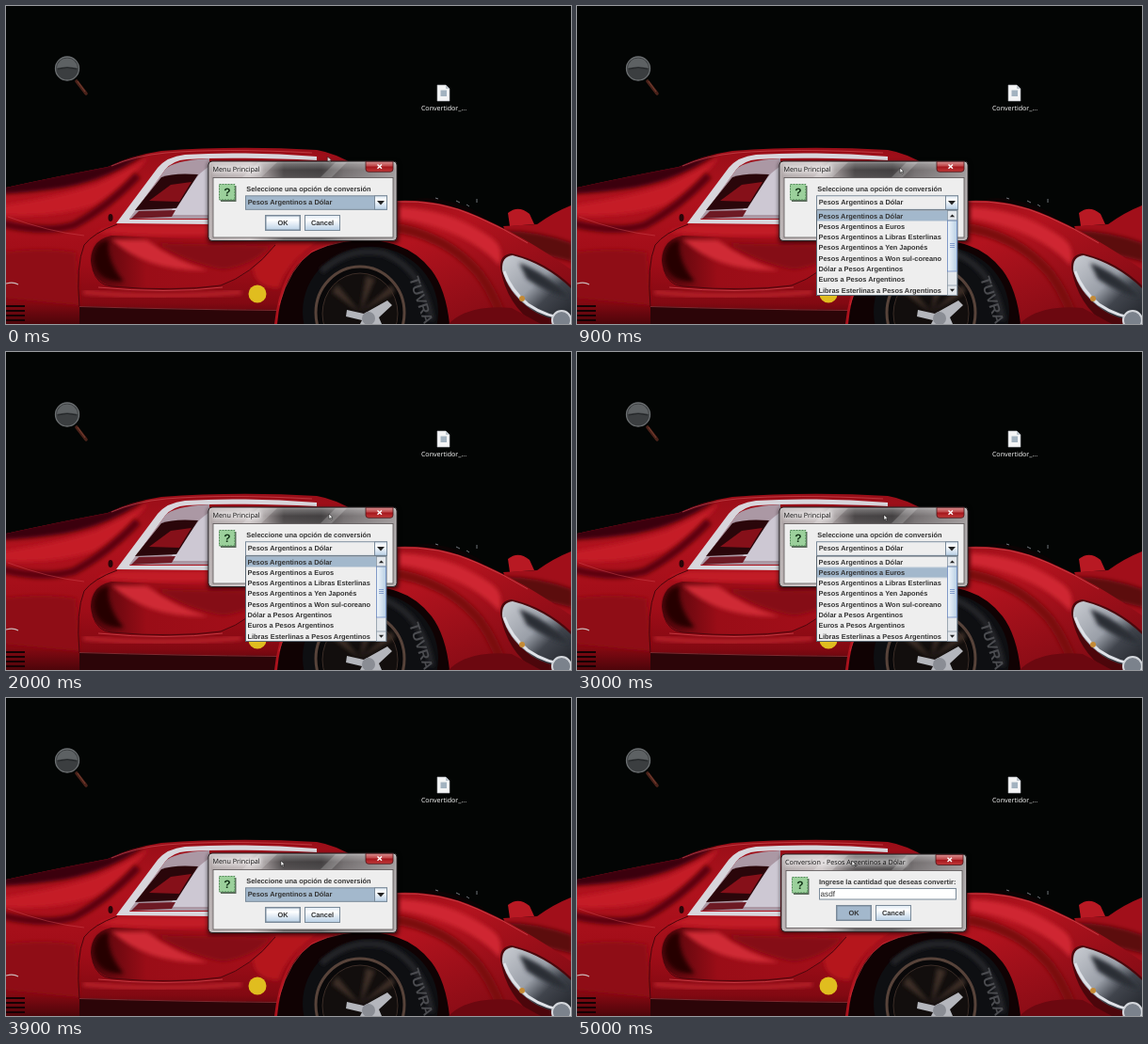
Recreate the animation shown at these times as an HTML page. Size 600 by 338 pixels, loop 5.1 s.

```html
<!DOCTYPE html>
<html lang="es">
<head>
<meta charset="utf-8">
<title>Convertidor</title>
<style>
  html, body { margin: 0; width: 100%; height: 100%; overflow: hidden; background: #030504; }
  svg { display: block; width: 600px; height: 338px; }
  text { font: bold 7.4px "Liberation Sans", Arial, sans-serif; fill: #333; text-rendering: geometricPrecision; white-space: pre; }
  .ui { font: 7.2px "Open Sans", "Noto Sans", sans-serif; fill: #111; }
  .mid { text-anchor: middle; }
  .typed { font-weight: normal; font-size: 8.2px; }
  .glow { fill: #fff; opacity: .5; filter: url(#soft); }
  .shade { filter: url(#soft); }
  .line { fill: none; }

  .menu, .ask, .list, .row, .press, .typed tspan { animation: 5.1s step-end infinite; }
  .menu { animation-name: menu; }
  .ask { animation-name: ask; }
  .list { animation-name: list; }
  .row { animation-name: row; }
  .press { animation-name: press; }
  .typed tspan:nth-child(1) { animation-name: key1; }
  .typed tspan:nth-child(2) { animation-name: key2; }
  .typed tspan:nth-child(3) { animation-name: key3; }
  .typed tspan:nth-child(4) { animation-name: key4; }
  .cursor { animation: move 5.1s linear infinite; }

  @keyframes menu { 0% { opacity: 1 } 82.35%, 100% { opacity: 0 } }
  @keyframes ask { 0% { opacity: 0 } 82.35%, 100% { opacity: 1 } }
  @keyframes list { 0% { opacity: 0 } 9.8% { opacity: 1 } 66.67%, 100% { opacity: 0 } }
  @keyframes row { 0% { transform: none } 49.02% { transform: translateY(11.3px) } 62.75%, 100% { transform: none } }
  @keyframes press { 0% { opacity: 0 } 96.08%, 100% { opacity: 1 } }
  @keyframes key1 { 0% { visibility: hidden } 88.24%, 100% { visibility: visible } }
  @keyframes key2 { 0% { visibility: hidden } 90.2%, 100% { visibility: visible } }
  @keyframes key3 { 0% { visibility: hidden } 92.16%, 100% { visibility: visible } }
  @keyframes key4 { 0% { visibility: hidden } 94.12%, 100% { visibility: visible } }
  @keyframes move {
    0% { transform: translate(341.5px, 160px) }
    7.84%, 43.14% { transform: translate(343px, 172px) }
    54.9%, 62.75% { transform: translate(326px, 173px) }
    72.55%, 100% { transform: translate(292px, 173px) }
  }
</style>
</head>
<body>
<svg viewBox="0 0 600 338">
  <defs>
    <linearGradient id="body" x2="0" y2="1">
      <stop offset="0" stop-color="#990e18"/><stop offset=".3" stop-color="#b0121d"/>
      <stop offset=".65" stop-color="#a00d18"/><stop offset=".88" stop-color="#830912"/><stop offset="1" stop-color="#4d050a"/>
    </linearGradient>
    <linearGradient id="fender" x2="1" y2="1">
      <stop offset="0" stop-color="#8d0c15"/><stop offset=".4" stop-color="#b2131e"/><stop offset="1" stop-color="#780912"/>
    </linearGradient>
    <linearGradient id="scoop" x2="1">
      <stop offset="0" stop-color="#4c050a"/><stop offset=".3" stop-color="#9a0d17"/><stop offset="1" stop-color="#a50f1a"/>
    </linearGradient>
    <linearGradient id="glass" x2="1">
      <stop offset="0" stop-color="#a3999a"/><stop offset=".22" stop-color="#bdb4b5"/><stop offset=".31" stop-color="#857d7e"/>
      <stop offset=".4" stop-color="#3b3738"/><stop offset=".6" stop-color="#322f30"/>
      <stop offset=".72" stop-color="#686364"/><stop offset="1" stop-color="#989293"/>
    </linearGradient>
    <linearGradient id="sheen" x2="0" y2="1">
      <stop offset="0" stop-color="#fff" stop-opacity=".35"/><stop offset=".1" stop-color="#fff" stop-opacity=".08"/>
      <stop offset=".22" stop-color="#fff" stop-opacity=".15"/><stop offset="1" stop-color="#fff" stop-opacity=".25"/>
    </linearGradient>
    <linearGradient id="close" x2="0" y2="1">
      <stop offset="0" stop-color="#d58f8f"/><stop offset=".45" stop-color="#bf4548"/>
      <stop offset=".5" stop-color="#a3151b"/><stop offset="1" stop-color="#c23a3a"/>
    </linearGradient>
    <linearGradient id="metal" x2="0" y2="1">
      <stop offset="0" stop-color="#dde8f3"/><stop offset=".3" stop-color="#fff"/><stop offset="1" stop-color="#b8cfe5"/>
    </linearGradient>
    <linearGradient id="bar" x2="1">
      <stop offset="0" stop-color="#f2f7fb"/><stop offset="1" stop-color="#b8cfe5"/>
    </linearGradient>
    <linearGradient id="lamp" x2="1" y2="1">
      <stop offset="0" stop-color="#c9ccd2"/><stop offset=".45" stop-color="#9a9fa8"/>
      <stop offset=".65" stop-color="#40444c"/><stop offset="1" stop-color="#22252b"/>
    </linearGradient>
    <filter id="soft" x="-20%" y="-50%" width="140%" height="200%"><feGaussianBlur stdDeviation="2.2"/></filter>

    <path id="shell" d="M0 193Q50 182 108 171Q132 159 165 154Q245 148 330 153Q372 160 415 208L470 338H0z"/>
    <clipPath id="in-shell"><use href="#shell"/></clipPath>

    <rect id="button" x=".5" y=".5" width="37" height="16" fill="url(#metal)" stroke="#7a8a99"/>
    <g id="ask-icon">
      <path d="M2 2H18.5V19H2z" fill="#5d6b5d"/>
      <rect x=".5" y=".5" width="16.5" height="16.5" fill="#9bd09b" stroke="#4f8a55" stroke-dasharray="2 1"/>
      <text class="mid" x="9" y="13" style="font-size:12px;fill:#143318">?</text>
    </g>
    <g id="close-box">
      <path d="M0 0H29V8Q29 11 26 11H3Q0 11 0 8z" fill="url(#close)" stroke="#4a1518" stroke-width=".8"/>
      <path d="M12.500 3.200l4.500 4.200m0-4.200l-4.500 4.200" stroke="#fff" stroke-width="1.4"/>
    </g>
    <path id="down" d="M-4-2H4L0 2.5z" fill="#222"/>
  </defs>

  <rect width="600" height="338" fill="#030504"/>

  <!-- car -->
  <g>
    <use href="#shell" fill="url(#body)"/>
    <g clip-path="url(#in-shell)">
      <path class="shade" d="M-5 190L108 169L150 156Q110 184 62 193Q30 198-5 200z" fill="#3a050a"/>
      <path class="shade" d="M-5 212Q58 203 98 189Q130 174 152 160Q122 196 92 212Q50 226-5 222z" fill="#c51c28"/>
      <path class="shade line" d="M-5 231Q40 242 72 233Q108 214 140 180" stroke="#5c060d" stroke-width="8"/>
      <path class="shade" d="M-5 262Q40 256 74 262L78 318L-5 310z" fill="#8f0b15"/>
      <path class="shade" d="M118 233H216V244Q150 246 96 240z" fill="#c21c27"/>
      <path class="shade line" d="M82 304Q160 312 250 304" stroke="#b8202a" stroke-width="5"/>
      <path class="shade" d="M240 250H335Q300 268 290 300Q262 300 262 275z" fill="#b5141f"/>
    </g>
    <path class="line" d="M2 224Q45 240 83 244" stroke="#d14a53" stroke-width=".8" opacity=".6"/>

    <path d="M117 231L161 172Q171 160 190 158Q250 154 330 160V164Q240 160 192 163Q177 164 169 174L131 227H216V232z" fill="#d8d6dc"/>
    <path d="M131 226L169 174Q177 164 216 162V226z" fill="#ab98a4"/>
    <path d="M178 214L206 178L216 170V222H172z" fill="#cdc8d3"/>
    <path d="M137 217L165 182Q178 177 204 179L181 215z" fill="#2a060a"/>
    <path d="M152 207L175 190L197 187L184 208z" fill="#861019"/>
    <path d="M133 226L141 218L180 217L176 224z" fill="#6d1a24"/>
    <path class="line" d="M112 170Q137 159 170 156Q230 151 325 156" stroke="#d85a60" stroke-width=".8" opacity=".7"/>
    <ellipse cx="111" cy="225" rx="2.500" ry="4" fill="#2a0508"/>
    <path class="line" d="M118 232Q93 241 83 254Q74 276 78 320" stroke="#4a050b"/>

    <path d="M90 270Q91 248 112 244Q190 247 287 252Q266 285 225 297Q160 302 112 298Q91 292 90 270z" fill="url(#scoop)"/>
    <path class="shade" d="M93 268Q95 249 109 249Q106 270 125 293Q95 294 93 268z" fill="#270205"/>
    <path class="shade" d="M112 248L150 249Q178 270 215 281Q150 283 112 248z" fill="#cf2b35"/>
    <path class="shade" d="M160 252L282 255Q262 276 230 280Q190 272 160 252z" fill="#850a13"/>
    <path class="line" d="M92 280Q97 297 112 298Q180 304 228 297Q260 286 286 254" stroke="#4e060c"/>
    <path class="line" d="M98 299Q170 306 230 299" stroke="#d0454c" stroke-width=".8"/>
    <path class="line" d="M0 319H20M0 324H20M0 329H20M0 334H20" stroke="#160204" stroke-width="2.2"/>
    <path class="line" d="M0 295Q8 293 13 296" stroke="#cbb" stroke-width="1.2"/>
    <path d="M78 319Q180 322 290 323V338H78z" fill="#2c0508"/>
    <path class="line" d="M78 319.500Q180 322.500 290 323.500" stroke="#94343b" stroke-width=".8"/>

    <path d="M528 234L564 232Q582 219 600 212V290L540 262z" fill="#a10f1a"/>
    <path class="shade" d="M520 239Q560 237 602 252V272L545 258z" fill="#5c070d"/>
    <path d="M533 220Q544 211 556 221L561 232L535 234z" fill="#b81923"/>
    <path d="M430 206Q455 200 490 214Q503 218 516 232L488 225z" fill="#0c0304"/>
    <path class="line" d="M500 205v4m-22-2l4 2m-26-5l3 1m30 6l3 2" stroke="#8c9099" stroke-width=".8"/>
    <path d="M285 338Q292 272 335 248L415 207Q460 205 500 223Q551 245 600 280V338z" fill="url(#fender)"/>
    <path class="shade" d="M418 214Q470 215 515 246Q530 256 524 276Q490 238 418 226z" fill="#cf2832"/>
    <path class="shade line" d="M416 236Q470 246 502 284Q520 308 528 336" stroke="#7c0911" stroke-width="10"/>
    <path class="line" d="M415 208Q461 206 500 224Q530 237 554 252" stroke="#df5c62" stroke-width=".8" opacity=".7"/>
    <path d="M288 338Q293 284 323 263Q350 247 387 249Q429 251 452 281Q467 301 471 338z" fill="#100203"/>
    <path class="line" d="M290 318Q301 278 325 261Q357 246 394 249" stroke="#c9343d" opacity=".7"/>
    <path d="M525 279Q524 264 537 263Q572 271 600 297V338H562Q532 318 525 279z" fill="#4c060b"/>
    <path d="M527 281Q526 266 538 265Q573 274 600 300V335Q571 334 553 319Q533 303 527 281z" fill="url(#lamp)"/>
    <path class="shade" d="M545 273Q575 284 598 310Q574 305 553 290z" fill="#2a2e35"/>
    <path class="line" d="M529 282Q536 302 554 317Q574 331 600 333" stroke="#dfe2e8" stroke-width="3"/>
    <circle cx="548" cy="311" r="3" fill="#c48a35"/>
    <circle cx="590" cy="334" r="10" fill="#7b828c" stroke="#d5d8dd" stroke-width="2"/>
    <path d="M470 338Q490 317 537 321L568 338z" fill="#6c0810"/>

    <ellipse cx="387" cy="325" rx="72" ry="69" fill="#0e0f12"/>
    <path class="shade line" d="M335 282Q365 255 402 263Q444 281 452 334" stroke="#25272c" stroke-width="6"/>
    <text class="mid" x="0" y="0" transform="translate(436 314) rotate(72)" style="font-size:15px;fill:#4b4c50">TUVRA</text>
    <ellipse cx="376" cy="326" rx="47" ry="49" fill="#090809" stroke="#57433a" stroke-width="3"/>
    <ellipse cx="376" cy="327" rx="40" ry="43" fill="#120e0d" stroke="#3b2d27"/>
    <path class="shade" d="M376 326L346 304L352 296zM376 326L382 287L392 290zM376 326L410 296L413 304z" fill="#3c2e28"/>
    <path d="M362 323L380 327L405 313L410 318L396 331L399 338H376L378 334L361 330z" fill="#b4b6bc"/>
    <circle cx="385" cy="332" r="7" fill="#8a8d94"/>
    <circle cx="267" cy="306" r="9.5" fill="#e0bd1f"/>
  </g>

  <!-- desktop -->
  <path d="M75 80L85 93" stroke="#4a221a" stroke-width="3.600" stroke-linecap="round"/>
  <path d="M76 80L84 91" stroke="#8a4836" stroke-width=".8"/>
  <circle cx="65" cy="66.500" r="12.500" fill="#3b3e40" stroke="#6c7072" stroke-width="1.300"/>
  <path d="M54 66Q55 56 65 55.500Q75 56 76 66Q65 63 54 66z" fill="#5d6163"/>
  <path class="line" d="M55 67Q65 64 75 67" stroke="#222527"/>
  <path d="M458 84H467L471 88V101H458z" fill="#f4f5f6" stroke="#a8adb2" stroke-width=".6"/>
  <path d="M467 84V88H471z" fill="#bcc4cb"/>
  <rect x="461.500" y="89.500" width="6.500" height="6.500" fill="#a3b3c0"/>
  <text class="ui mid" x="465" y="110.5" style="font-size:7.1px;fill:#fff">Convertidor_...</text>

  <!-- option dialog -->
  <g class="menu">
    <rect class="shade" x="214" y="166" width="203" height="86" rx="4" opacity=".6"/>
    <rect x="215" y="165" width="200" height="84.5" rx="4" fill="url(#glass)" stroke="#292526"/>
    <path d="M268 166H288L270 183H250zM350 166H362L345 183H333z" fill="#fff" opacity=".2"/>
    <rect x="216" y="166" width="198" height="82.500" rx="3" fill="url(#sheen)" stroke="#fff" stroke-opacity=".45" stroke-width=".7"/>
    <rect class="glow" x="219" y="169" width="52" height="9"/>
    <text class="ui" x="219.5" y="175.8">Menu Principal</text>
    <use href="#close-box" x="382" y="165.3"/>
    <rect x="220" y="182.5" width="191" height="63.5" fill="#eee" stroke="#595354" stroke-width=".8"/>
    <use href="#ask-icon" x="226" y="189"/>
    <text x="255.3" y="197">Seleccione una opción de conversión</text>
    <rect x="254.5" y="201.800" width="150" height="14.5" fill="#a3b8cc" stroke="#7a8a99"/>
    <rect x="391.5" y="201.800" width="13" height="14.5" fill="url(#metal)" stroke="#7a8a99"/>
    <use href="#down" x="398" y="209"/>
    <text x="256.7" y="211.3">Pesos Argentinos a Dólar</text>
    <use href="#button" x="275" y="222"/>
    <rect x="276" y="223" width="36" height="15" class="line" stroke="#7a8a99"/>
    <use href="#button" x="317" y="222"/>
    <text class="mid" x="294" y="233.2">OK</text>
    <text class="mid" x="336" y="233.2">Cancel</text>

    <g class="list">
      <rect x="255" y="202.3" width="136" height="13.5" fill="#eee"/>
      <text x="256.7" y="211.3">Pesos Argentinos a Dólar</text>
      <rect x="254.5" y="217" width="149.5" height="90.5" fill="#eee" stroke="#596570"/>
      <rect class="row" x="255" y="217.5" width="138.5" height="11" fill="#a3b8cc"/>
      <text>
        <tspan x="256.5" y="225.5">Pesos Argentinos a Dólar</tspan>
        <tspan x="256.5" dy="11.3">Pesos Argentinos a Euros</tspan>
        <tspan x="256.5" dy="11.3">Pesos Argentinos a Libras Esterlinas</tspan>
        <tspan x="256.5" dy="11.3">Pesos Argentinos a Yen Japonés</tspan>
        <tspan x="256.5" dy="11.3">Pesos Argentinos a Won sul-coreano</tspan>
        <tspan x="256.5" dy="11.3">Dólar a Pesos Argentinos</tspan>
        <tspan x="256.5" dy="11.3">Euros a Pesos Argentinos</tspan>
        <tspan x="256.5" dy="11.3">Libras Esterlinas a Pesos Argentinos</tspan>
      </text>
      <rect x="393.5" y="217.5" width="10" height="90" fill="#e4e8ec" stroke="#7a8a99" stroke-width=".7"/>
      <rect x="393.5" y="228" width="10" height="54" fill="url(#bar)" stroke="#6382bf" stroke-width=".7"/>
      <path d="M396 252.5h5m-5 2h5m-5 2h5" stroke="#6382bf" stroke-width=".7"/>
      <path d="M393.5 228h10m-10 69h10" stroke="#7a8a99" stroke-width=".7"/>
      <use href="#down" transform="translate(398.5 223) scale(.65 -.65)"/>
      <use href="#down" transform="translate(398.5 302) scale(.65)"/>
    </g>
  </g>

  <!-- amount dialog -->
  <g class="ask">
    <rect class="shade" x="216" y="167" width="199" height="83" rx="4" opacity=".6"/>
    <rect x="217" y="166" width="196.5" height="82.3" rx="4" fill="url(#glass)" stroke="#292526"/>
    <path d="M268 167H288L270 184H250zM350 167H362L345 184H333z" fill="#fff" opacity=".2"/>
    <rect x="218" y="167" width="194.5" height="80.3" rx="3" fill="url(#sheen)" stroke="#fff" stroke-opacity=".45" stroke-width=".7"/>
    <rect class="glow" x="220" y="170" width="131" height="9"/>
    <text class="ui" x="221" y="177">Conversion - Pesos Argentinos a Dólar</text>
    <use href="#close-box" x="381" y="166.5"/>
    <rect x="222" y="183.5" width="187" height="61" fill="#eee" stroke="#595354" stroke-width=".8"/>
    <use href="#ask-icon" x="228" y="190"/>
    <text x="257" y="197.7">Ingrese la cantidad que deseas convertir:</text>
    <rect x="257.5" y="202.5" width="145" height="11.5" fill="#fff" stroke="#7a8a99"/>
    <text class="typed" x="258.5" y="211.3"><tspan>a</tspan><tspan>s</tspan><tspan>d</tspan><tspan>f</tspan></text>
    <use href="#button" x="275" y="220"/>
    <rect class="press" x="276" y="221" width="36" height="15" fill="#a3b8cc"/>
    <rect x="276" y="221" width="36" height="15" class="line" stroke="#7a8a99"/>
    <use href="#button" x="317" y="220"/>
    <text class="mid" x="294" y="231.2">OK</text>
    <text class="mid" x="336" y="231.2">Cancel</text>
  </g>

  <path class="cursor" d="M0 0V5.5L1.3 4.3L2.2 6.3L3.2 5.9L2.3 3.9H4z" fill="#fff" stroke="#111" stroke-width=".5"/>
</svg>
</body>
</html>
```
